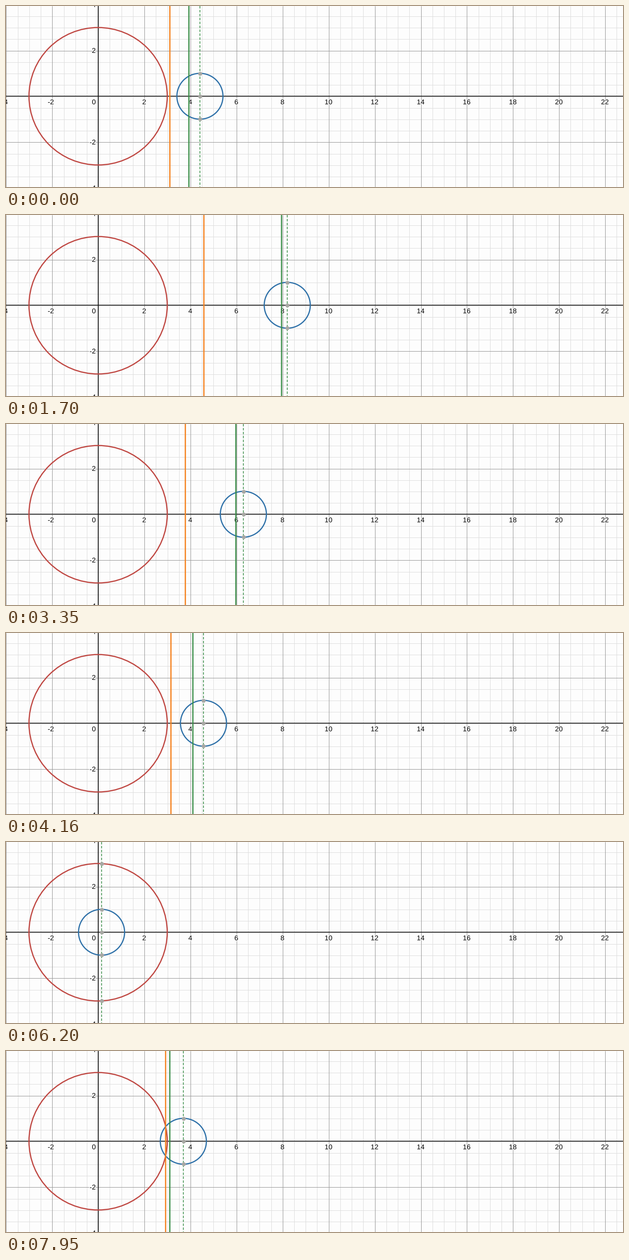
A matplotlib script that plays this animation: 1244 px wide and 367 px high, repeating every 7.99 s.

```python
import numpy as np
import matplotlib.pyplot as plt
from matplotlib import patheffects
from matplotlib.animation import FuncAnimation
from matplotlib.collections import LineCollection
from matplotlib.patches import Circle

W, H, DPI = 1244, 367, 64
PX = 72 / DPI                      # one pixel in points
OX, OY, UNIT = 185.7, 183.0, 46.45
FRAMES, INTERVAL = 235, 34
R_BIG, R_SMALL, FAR = 3, 1, 9

PAPER, MINOR, MAJOR, INK = "#fdfdfd", "#dedede", "#999999", "#1c1c1c"
RED, BLUE, GREEN, ORANGE, DOT = "#bf4641", "#2d70a8", "#388c46", "#f5821f", "#a8a8a4"

# travelled distance of the small circle at a few ticks
TICKS = [0, 28, 73, 122, 154, 182, 233]
TRAVEL = [4.42, 6.60, 9.893, 13.425, 15.675, 17.85, 21.70]


def sx(x):
    return OX + UNIT * x


def sy(y):
    return OY - UNIT * y


def crisp(v):
    return np.floor(v) + 0.5


fig = plt.figure(figsize=(W / DPI, H / DPI), dpi=DPI, facecolor=PAPER)
ax = fig.add_axes([0, 0, 1, 1])
ax.set_xlim(0, W)
ax.set_ylim(H, 0)
ax.axis("off")


def grid(xs, ys, color, z):
    segs = [[(crisp(sx(x)), 0), (crisp(sx(x)), H)] for x in xs]
    segs += [[(0, crisp(sy(y))), (W, crisp(sy(y)))] for y in ys]
    ax.add_collection(LineCollection(segs, colors=color, linewidths=PX, zorder=z),
                      autolim=False)


def label(x, y, text, ha):
    t = ax.text(x, y, text, ha=ha, va="center_baseline", color="black", zorder=4,
                family="Liberation Sans", size=14 * PX, clip_on=True)
    t.set_path_effects([patheffects.withStroke(linewidth=3 * PX, foreground=PAPER)])


def ring(x, r, color):
    return ax.add_patch(Circle((sx(x), OY), r * UNIT, fill=False, ec=color,
                               lw=2.4 * PX, zorder=5))


def vline(color, width, style="-"):
    line, = ax.plot([0, 0], [0, H], color=color, lw=width * PX, ls=style,
                    dash_capstyle="butt", zorder=6, snap=False)
    return line


grid(np.arange(-4, 23, 0.5), np.arange(-4, 4.5, 0.5), MINOR, 1)
grid(range(-4, 24, 2), (-4, -2, 2, 4), MAJOR, 2)
ax.plot([185.9, 185.9], [0, H], color=INK, lw=1.7 * PX, zorder=3, snap=False)
ax.plot([0, W], [182.8, 182.8], color=INK, lw=1.7 * PX, zorder=3, snap=False)

for n in range(-4, 24, 2):
    if n:
        label(sx(n) - (2.4 if n < 0 else 0), 193.8, str(n), "center")
label(181, 193.8, "0", "right")
for n in (-4, -2, 2, 4):
    label(181, sy(n) - 0.6, str(n), "right")

ring(0, R_BIG, RED)
small = ring(0, R_SMALL, BLUE)
orange = vline(ORANGE, 2.5)
green = vline(GREEN, 2.4)
dashed = vline(GREEN, 1.5, (0, (3.3, 2)))
dots, = ax.plot([], [], "o", ms=8 * PX, mfc=DOT, mec="none", zorder=7)


def update(i):
    travel = np.interp(i, TICKS, TRAVEL)
    c = max(FAR - abs(travel % (2 * FAR) - FAR), 1e-3)

    small.center = (sx(c), OY)
    radical = sx((c * c + R_BIG**2 - R_SMALL**2) / (2 * c))
    orange.set_xdata([radical] * 2)
    orange.set_visible(radical < W + 5)
    green.set_visible(c >= 2)
    green.set_xdata([sx(np.sqrt(max(c * c - 4, 0)))] * 2)
    dashed.set_xdata([sx(c)] * 2)

    ys = [0, R_SMALL, -R_SMALL]
    if c <= R_BIG:
        h = np.sqrt(R_BIG**2 - c * c)
        ys += [h, -h]
    dots.set_data([sx(c)] * len(ys), [sy(y) for y in ys])
    return small, orange, green, dashed, dots


anim = FuncAnimation(fig, update, frames=FRAMES, interval=INTERVAL,
                     repeat=True, repeat_delay=0, blit=False)
plt.show()
```
